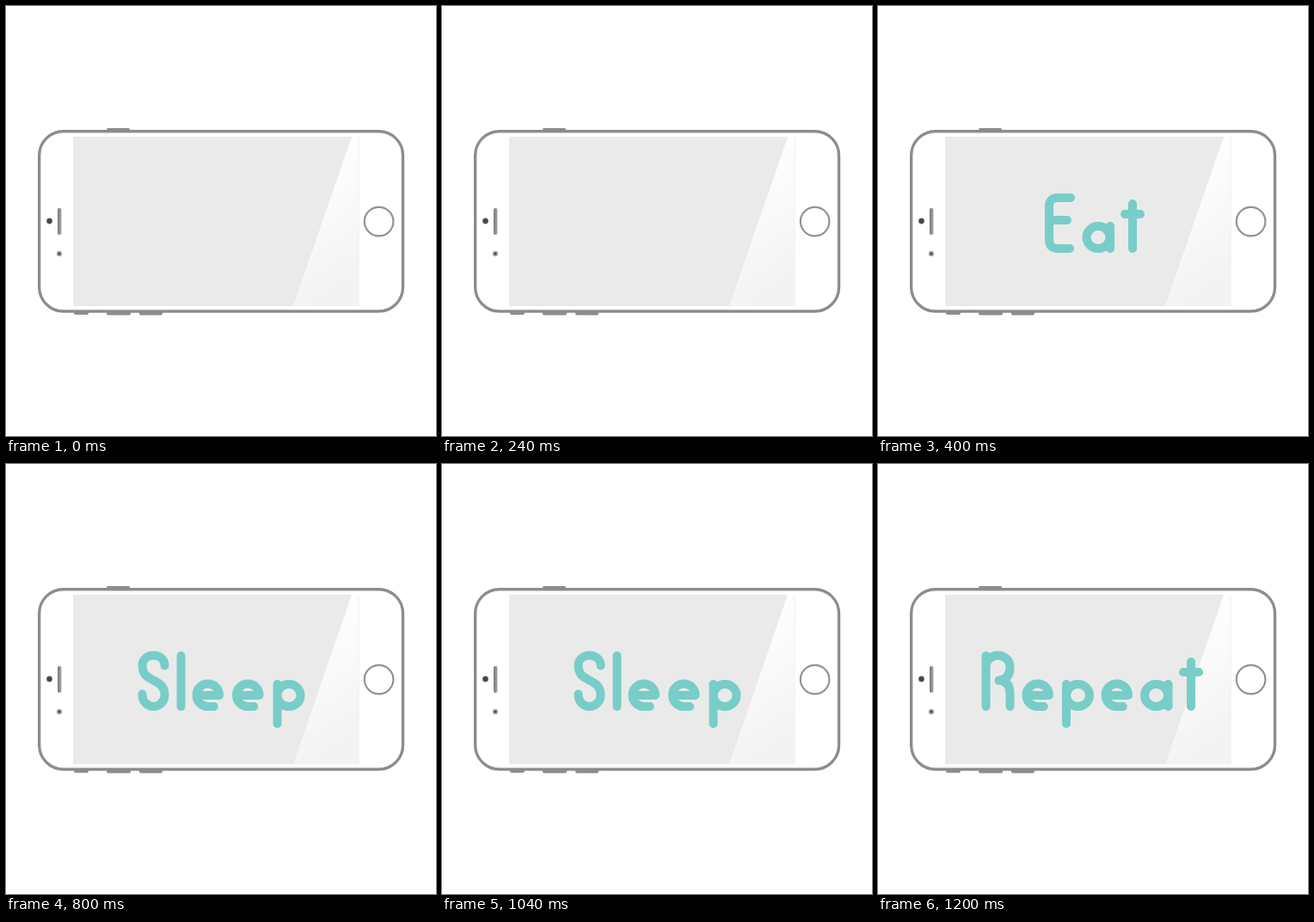
Animation, 500 px wide and 500 px high, one loop 1.6 s. Source, as an HTML page:

```html
<!DOCTYPE html>
<html lang="en">
<head>
<meta charset="utf-8">
<title>Eat Sleep Repeat</title>
<style>
html, body { margin: 0; width: 100%; height: 100%; overflow: hidden; background: #fff; }
svg { display: block; width: 100%; height: 100%; }
</style>
</head>
<body>
<svg viewBox="0 0 500 500" role="img">
  <defs>
    <linearGradient id="glare" x1="0" y1="0" x2="0.25" y2="1">
      <stop offset="0" stop-color="#fff"/>
      <stop offset="0.4" stop-color="#fcfcfc"/>
      <stop offset="1" stop-color="#f3f3f3"/>
    </linearGradient>
    <linearGradient id="slot">
      <stop offset="0" stop-color="#777"/>
      <stop offset="1" stop-color="#aaa"/>
    </linearGradient>
  </defs>
  <g fill="#8c8c8c">
    <rect x="117" y="142" width="27" height="5" rx="1.5"/>
    <rect x="79" y="353" width="17" height="6" rx="2"/>
    <rect x="117" y="353" width="28" height="6.5" rx="2"/>
    <rect x="155" y="353" width="27" height="6.5" rx="2"/>
  </g>
  <rect x="38.7" y="145.7" width="422.8" height="209.3" rx="28" fill="#fff" stroke="#929292" stroke-width="3.4"/>
  <rect x="38.2" y="145.2" width="423.8" height="210.3" rx="28.5" fill="none" stroke="#858585" stroke-width="1"/>
  <rect x="78" y="152" width="332" height="197" fill="#eaeaea"/>
  <path d="M402 152H410V349H334Z" fill="url(#glare)"/>
  <path d="M410 152V349" stroke="#eee"/>
  <rect x="60" y="235" width="4.5" height="31" rx="2" fill="url(#slot)"/>
  <circle cx="50.5" cy="250" r="3.2" fill="#444" stroke="#777" stroke-width="0.8"/>
  <circle cx="62" cy="288" r="2.4" fill="#444" stroke="#aaa" stroke-width="1.6"/>
  <circle cx="433.6" cy="250.6" r="16.8" fill="#fff" stroke="#939393" stroke-width="2.2"/>
  <path id="word" fill="none" stroke="#78cdc8" stroke-width="10" stroke-linecap="round" stroke-linejoin="round"/>
</svg>
<script>
const STEP = 400;
const svg = document.querySelector("svg");
const word = document.getElementById("word");

// Pen strokes of each letter, with x = 0 at its left centre line
const glyphs = {
  E: "m25 223h-15q-10 0 -10 10v39q0 10 10 10h14m-24 -33h21",
  S: "m26.5 234.5v-1a13 11 0 0 0 -26 0c0 11 5 14 13 18s13 8 13 17a13 13.5 0 0 1 -26 0v-1",
  R: "m0 223v59m0 -46a14 13.5 0 0 1 28 0q0 14.5 -13 15.5q13 1 13 15v15.5",
  l: "m0 223v59",
  e: "m0 269h26.5a13.25 13.2 0 1 0 -13.25 13h7",
  a: "m0 269a13.5 13 0 1 0 27 0a13.5 13 0 1 0 -27 0m27.5 -13v26",
  p: "m0 269a13.5 13 0 1 0 27 0a13.5 13 0 1 0 -27 0m0 -13v46",
  t: "m0 230v52m-9 -40h18"
};

// Each word with the left centre line of its letters
const words = [
  ["", []],
  ["Eat", [199, 242.5, 296]],
  ["Sleep", [158, 203.5, 221.5, 268, 315.5]],
  ["Repeat", [125.5, 172.5, 219, 264.5, 310, 364]]
];

const trace = ([text, xs]) =>
  [...text].map((c, i) => `M${xs[i]} 0${glyphs[c]}`).join("");

function draw(time) {
  const current = words[Math.floor(time / STEP) % words.length];
  word.setAttribute("d", trace(current));
  svg.setAttribute("aria-label", current[0]);
}

const start = performance.now();
function tick() {
  draw(performance.now() - start);
  requestAnimationFrame(tick);
}
tick();
</script>
</body>
</html>
```
